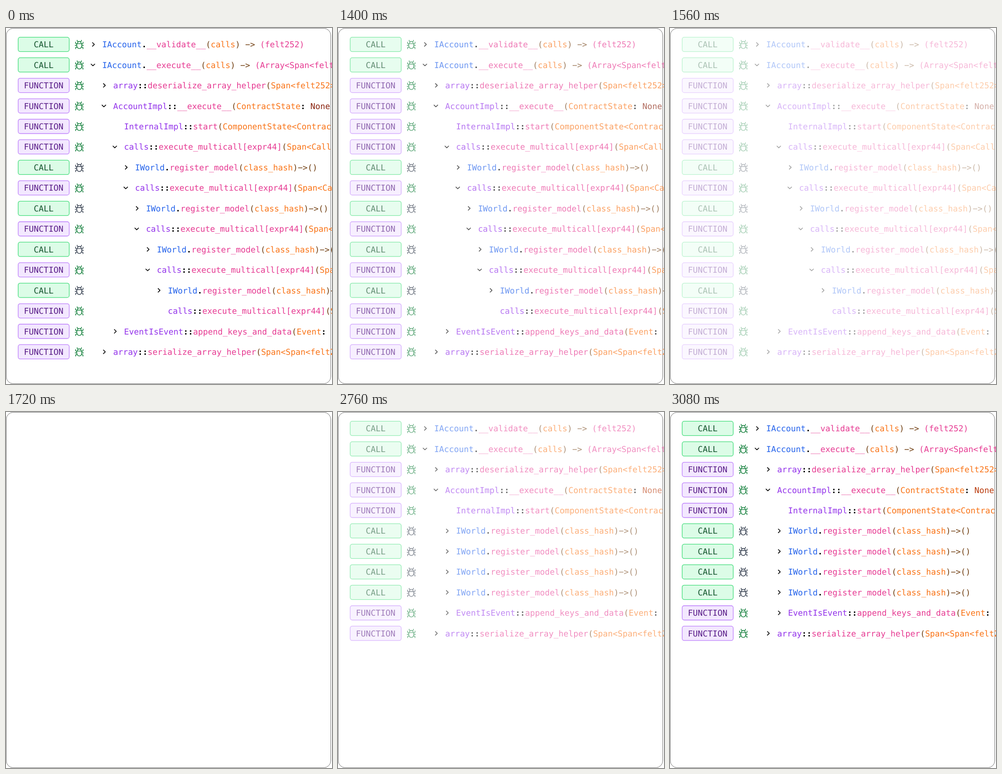
An HTML page for the animation above (4040 ms loop, 660 px wide and 720 px high).

```html
<!DOCTYPE html>
<html lang="en">
<head>
<meta charset="utf-8">
<title>Call trace</title>
<style>
html, body { margin: 0; width: 100%; height: 100%; overflow: hidden; background: #fff; }
svg { display: block; }
text {
  font: 16.58px "DejaVu Sans Mono", monospace;
  white-space: pre;
  text-rendering: geometricPrecision;
}
.line { fill: none; stroke-linecap: round; stroke-linejoin: round; }
</style>
</head>
<body>
<svg id="stage" width="660" height="720" viewBox="0 0 660 720">
  <rect x="0.5" y="0.5" width="657" height="719" rx="14.5" fill="#fff" stroke="#7c7c7c"/>
</svg>
<script>
const stage = document.getElementById("stage");

const COLORS = {
  b: "#2563eb", // interface
  v: "#9333ea", // module
  p: "#e63a92", // function name, return type
  o: "#f97316", // argument
  n: "#713f12", // bracket, arrow
  k: "#000",    // separator
  d: "#8a2410", // value
  r: "#b93a0c"
};
const BADGES = {
  CALL: { fill: "#dcfce7", stroke: "#4ade80", ink: "#14532d" },
  FUNCTION: { fill: "#f3e8ff", stroke: "#c084fc", ink: "#581c87" }
};
const CHEVRONS = { ">": "M-1.9-3.7L1.9 0L-1.9 3.7", "v": "M-4.7-1.7L-1 1.9L2.7-1.7" };
const HALF_LEGS = "M4.3-8.6v1.5l-2 1.7M5-.8L7.6-2.4V-5M5 1.9H8.4M4.6 4.9L7.4 6.1V8.6";
const BUG_BODY = "M-3.8-1.8v-.9a3.8 3.4 0 0 1 7.6 0v.9M-5-1.8H5V2.8a5 5.4 0 0 1-10 0z";

// Each token starts with its color key.
const modelCall = "bIWorld|k.|pregister_model|n(|oclass_hash|n)\u2212>()";
const multicall = arg => "vcalls|k::|pexecute_multicall[expr44]|n(|o" + arg;
const call = (level, arrow, tokens, dark) => ({ kind: "CALL", level, arrow, tokens, dark });
const fn = (level, arrow, tokens) => ({ kind: "FUNCTION", level, arrow, tokens });

const head = valueKey => [
  call(0, ">", "bIAccount|k.|p__validate__|n(|ocalls|n) \u2212> |p(felt252)"),
  call(0, "v", "bIAccount|k.|p__execute__|n(|ocalls|n) \u2212> |p(Array<Span<felt"),
  fn(1, ">", "varray|k::|pdeserialize_array_helper|n(|oSpan<felt252>"),
  fn(1, "v", "vAccountImpl|k::|p__execute__|n(|oContractState|k:|" + valueKey + " None"),
  fn(2, "", "vInternalImpl|k::|pstart|n(|oComponentState<Contrac")
];
const tail = [
  fn(2, ">", "vEventIsEvent|k::|pappend_keys_and_data|n(|oEvent|k:"),
  fn(1, ">", "varray|k::|pserialize_array_helper|n(|oSpan<Span<felt2")
];
const nested = ["Span<Call", "Span<Ca", "Span<", "Spa"].flatMap((arg, i) => [
  fn(2 + i, "v", multicall(arg)),
  call(3 + i, ">", modelCall, true)
]);
const flat = Array.from({ length: 4 }, () => call(2, ">", modelCall, true));

function add(parent, tag, attrs, content = "") {
  const el = document.createElementNS("http://www.w3.org/2000/svg", tag);
  for (const key in attrs) el.setAttribute(key, attrs[key]);
  el.textContent = content;
  return parent.appendChild(el);
}

function drawRow(parent, row, index) {
  const g = add(parent, "g", { transform: `translate(0 ${33.2 + 41.45 * index})` });
  const { fill, stroke, ink } = BADGES[row.kind];
  add(g, "rect", { x: 24.6, y: -14.5, width: 103.4, height: 29, rx: 4.2, fill, stroke, "stroke-width": 1.3 });
  add(g, "text", { x: 76.2, y: 6, "text-anchor": "middle", fill: ink }, row.kind);

  const bug = add(g, "g", {
    class: "line", transform: "translate(148.4 .2)",
    stroke: row.dark ? "#374151" : "#15803d", "stroke-width": 1.4
  });
  add(bug, "path", { d: BUG_BODY });
  add(bug, "path", { d: HALF_LEGS });
  add(bug, "path", { d: HALF_LEGS, transform: "scale(-1 1)" });

  const x = 194.8 + 22.15 * row.level;
  if (row.arrow) {
    add(g, "path", {
      class: "line", d: CHEVRONS[row.arrow], transform: `translate(${x - 17.8} 0)`,
      stroke: "#000", "stroke-width": 1.5
    });
  }
  const text = add(g, "text", { x, y: 6 });
  for (const token of row.tokens.split("|")) {
    const key = token[0];
    add(text, "tspan", { fill: COLORS[key], "font-weight": key === "k" ? 700 : 400 }, token.slice(1));
  }
}

function drawTree(rows) {
  const g = add(stage, "g", {});
  rows.forEach((row, i) => drawRow(g, row, i));
  return g;
}

const full = drawTree([...head("d"), ...nested, fn(6, "", multicall("S")), ...tail]);
const compact = drawTree([...head("r"), ...flat, ...tail]);

const LOOP = 4040, STEP = 40, FADE = 520, OUT = 1200, IN = 2560;
const progress = (t, start) => Math.min(1, Math.floor((t - start) / STEP) * STEP / FADE);

function fadeOut(t) {
  if (t < OUT) return 1;
  const p = progress(t, OUT);
  return Math.max(0, 0.99 - 0.738 * p - 0.252 * p * p);
}

function fadeIn(t) {
  if (t < IN) return 0;
  const p = progress(t, IN);
  return 0.08 + 1.49 * p - 0.57 * p * p;
}

function show(group, opacity) {
  group.setAttribute("opacity", opacity);
  group.setAttribute("visibility", opacity > 0 ? "visible" : "hidden");
}

const start = performance.now();
function render(now) {
  const t = Math.max(0, now - start) % LOOP;
  show(full, fadeOut(t));
  show(compact, fadeIn(t));
  requestAnimationFrame(render);
}
render(start);
</script>
</body>
</html>
```
